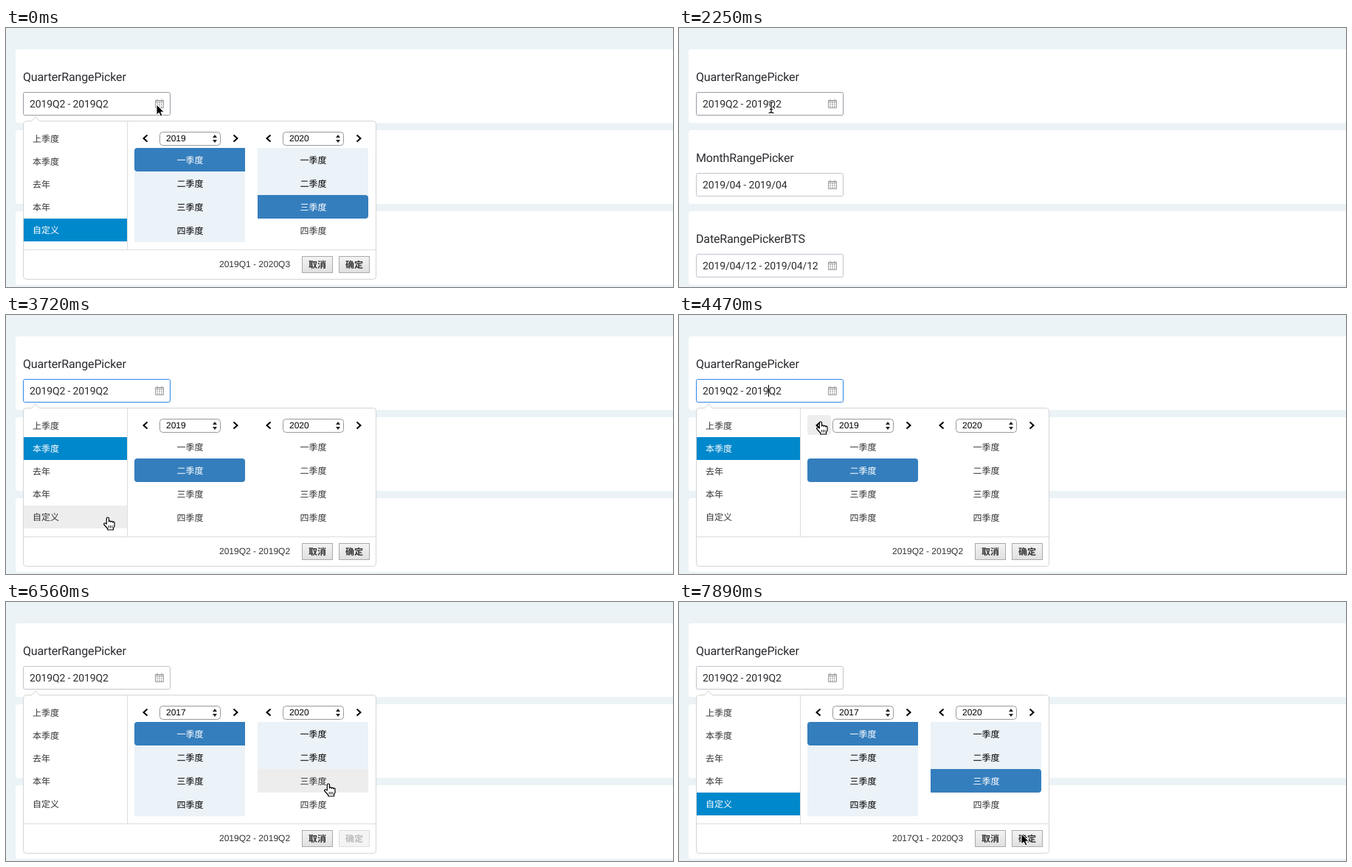
These frames come from a looping animation (904x352 px, 8 s). An HTML page:

```html
<!DOCTYPE html>
<html lang="zh">
<head>
<meta charset="utf-8">
<title>Quarter range picker</title>
<style>
  html, body { margin: 0; width: 100%; height: 100%; overflow: hidden; background: #ebf3f6; }
  svg { display: block; }
  text { font: 12px "Noto Sans CJK SC", "Noto Sans CJK", sans-serif; fill: #333; text-rendering: geometricPrecision; }
  .title { font: 16px Roboto, sans-serif; fill: #2b2b30; letter-spacing: -.01em; }
  .value { font: 14px Roboto, sans-serif; fill: #2b2b30; letter-spacing: -.01em; }
  .num { font: 12px "Liberation Sans", Arial, sans-serif; }
  .mid { text-anchor: middle; }
  .medium { font-weight: 500; }
  .bold { font-weight: 700; }
</style>
</head>
<body>
<svg id="stage" width="904" height="352" viewBox="0 0 904 352"></svg>
<script>
const LOOP = 8000, TICK = 148.8;
const stage = document.getElementById('stage');

const PRESETS = ['上季度', '本季度', '去年', '本年', '自定义'];
const QUARTERS = ['一季度', '二季度', '三季度', '四季度'];
const FIELDS = [
  ['QuarterRangePicker', '2019Q2 - 2019Q2'],
  ['MonthRangePicker', '2019/04 - 2019/04'],
  ['DateRangePickerBTS', '2019/04/12 - 2019/04/12']
];

// Pointer path: tick, x, y
const PATH = [
  [0, 204, 104], [2, 204, 104], [5, 112, 195], [7, 112, 195], [13, 122, 120],
  [15, 125, 107], [20, 122, 106], [22, 88, 212], [24, 97, 281], [26, 178, 268],
  [29, 193, 150], [30, 192, 145], [35, 192, 145], [38, 227, 180], [40, 227, 180],
  [44, 437, 247], [47, 430, 243], [48, 430, 243], [53, 464, 315]
];

// State changes by tick
const STATES = [
  [0, { open: true, preset: 4, year: 2019, from: 0, to: 6, label: '2019Q1 - 2020Q3' }],
  [7, { open: false }],
  [20, { open: true, focus: true, preset: 1, from: 1, to: 1, label: '2019Q2 - 2019Q2' }],
  [31, { focus: false, year: 2018, from: -1, to: -1 }],
  [33, { year: 2017 }],
  [39, { preset: -1, from: 0, to: -1, pending: true }],
  [46, { preset: 4, to: 6, pending: false, label: '2017Q1 - 2020Q3' }]
];

const rect = (x, y, w, h, fill, more = '') =>
  `<rect x="${x}" y="${y}" width="${w}" height="${h}" fill="${fill}" ${more}/>`;
const path = (d, fill, more = '') => `<path d="${d}" fill="${fill}" ${more}/>`;
const text = (x, y, s, cls = '', fill = '') =>
  `<text x="${x}" y="${y}" class="${cls}"${fill && ` style="fill:${fill}"`}>${s}</text>`;
const within = (p, x, y, w, h) => p.x >= x && p.x < x + w && p.y >= y && p.y < y + h;

function pointerAt(k) {
  const i = PATH.findIndex(p => p[0] > k);
  if (i < 0) return { x: PATH.at(-1)[1], y: PATH.at(-1)[2] };
  const [a, b] = [PATH[i - 1], PATH[i]];
  const f = (k - a[0]) / (b[0] - a[0]);
  return { x: Math.round(a[1] + (b[1] - a[1]) * f), y: Math.round(a[2] + (b[2] - a[2]) * f) };
}

const stateAt = k => Object.assign({}, ...STATES.filter(s => s[0] <= k).map(s => s[1]));

function hitTest(p, open) {
  const hit = { input: within(p, 23, 87, 200, 32), preset: -1, cell: -1, prev: false };
  if (!open) return hit;
  if (within(p, 24, 135, 140, 155)) hit.preset = Math.floor((p.y - 135) / 31);
  if (within(p, 174, 163, 317, 128))
    hit.cell = (p.x < 333 ? 0 : 4) + Math.floor((p.y - 163) / 32);
  hit.prev = within(p, 174, 136, 32, 27);
  return hit;
}

function calendarIcon(y) {
  let dots = '';
  for (let r = 0; r < 3; r++)
    for (let c = 0; c < 3; c++) dots += rect(204 + c * 3, y + 4 + r * 2.5, 2, 1.4, '#aaa');
  return path(`M202.5 ${y + 1.5}h11v10h-11zM205 ${y - 0.5}v2.5M211 ${y - 0.5}v2.5M202.5 ${y + 3}h11`,
    'none', 'stroke="#999"') + dots;
}

function field([title, value], i, border) {
  const y = 29 + i * 110;
  return rect(13, y, 900, 100, '#fff', 'rx="4"') +
    text(23, y + 43, title, 'title') +
    rect(23.5, y + 58.5, 199, 31, '#fff', `rx="2" stroke="${border}"`) +
    text(32, y + 79, value, 'value') + calendarIcon(y + 68);
}

const chevron = (x, dir) =>
  path(`M${x - 2.5 * dir} 145.5l${5 * dir} 4.5l${-5 * dir} 4.5`, 'none', 'stroke="#000" stroke-width="2"');

function header(x, year) {
  return chevron(x + 15, -1) + chevron(x + 137, 1) +
    rect(x + 34.5, 141.5, 82, 18, '#fff', 'rx="4" stroke="#999"') +
    text(x + 43, 154, year, 'num', '#000') +
    path(`M${x + 106} 149l3-4 3 4zM${x + 106} 152l3 4 3-4z`, '#222');
}

// A cell with independently rounded left and right ends
function cellShape(x, y, left, right, fill) {
  const l = left ? 4 : 0, r = right ? 4 : 0;
  return path(`M${x + l} ${y}H${x + 150 - r}q${r} 0 ${r} ${r}V${y + 32 - r}q0 ${r} ${-r} ${r}` +
    `H${x + l}q${-l} 0 ${-l} ${-l}V${y + l}q0 ${-l} ${l} ${-l}z`, fill);
}

function cell(i, s, hit) {
  const x = i < 4 ? 174 : 341, y = 163 + (i % 4) * 32;
  const end = s.pending ? hit.cell : s.to;
  const active = i === s.from || i === s.to, hover = i === hit.cell;
  const ranged = s.from >= 0 && i > s.from && i < end;
  let bg = '', ink = '#333';
  if (active) {
    bg = cellShape(x, y, i === s.from, i === s.to || s.pending && end <= s.from, '#357ebd');
    ink = '#fff';
  } else if (hover) {
    bg = cellShape(x, y, !s.pending, !s.pending, '#ededed');
  } else if (ranged) {
    bg = cellShape(x, y, false, false, '#ebf2f8');
    ink = '#000';
  }
  return bg + text(x + 75.5, y + 21, QUARTERS[i % 4], active ? 'mid medium' : 'mid', ink);
}

function button(x, label, off) {
  return rect(x + 0.5, 310.5, 41, 22, off ? '#f4f4f4' : 'url(#face)', `stroke="${off ? '#ddd' : '#aaa'}"`) +
    text(x + 21, 325.5, label, 'mid bold', off ? '#bbb' : '#333');
}

function panel(s, hit) {
  let out = rect(23.5, 126.5, 478, 215, '#fff', 'rx="4" stroke="#d4d4d4"') +
    path('M34 127l6-6 6 6', '#fff', 'stroke="#d4d4d4"') +
    path('M164.5 127v174M24 301.5h477', 'none', 'stroke="#ddd"');
  PRESETS.forEach((name, i) => {
    const y = 135 + i * 31, on = i === s.preset;
    if (on || i === hit.preset) out += rect(24, y, 140, 31, on ? '#08c' : '#ededed');
    out += text(36, y + 20, name, on ? 'medium' : '', on ? '#fff' : '');
  });
  if (hit.prev) out += rect(174, 136, 32, 27, '#ededed', 'rx="4"');
  out += header(174, s.year) + header(341, 2020);
  for (let i = 0; i < 8; i++) out += cell(i, s, hit);
  return out + text(289, 325, s.label, 'num') +
    button(401, '取消', false) + button(451, '确定', s.pending);
}

function pointer(p, hit) {
  let shape;
  if (hit.preset >= 0 || hit.cell >= 0 || hit.prev) {
    shape = path('M-1.7 9V1.6a1.6 1.6 0 0 1 3.2 0V6a1.3 1.3 0 0 1 2.6.4a1.3 1.3 0 0 1 2.6.5' +
      'a1.2 1.2 0 0 1 2.3.6V12L7.5 14.5V17H-.2V15.5L-5 10a1.3 1.3 0 0 1 2-1.8z', '#fff',
      'stroke="#000" stroke-width="1.2" stroke-linejoin="round"') +
      path('M1.2 11v3.5M3.5 11v3.5M5.8 11v3.5', 'none', 'stroke="#000" stroke-width=".9"');
  } else if (hit.input && p.x < 200) {
    const d = 'M-3.5-6.5q3 0 3.5 1.5q.5-1.5 3.5-1.5M0-5V7M-3.5 8.5q3 0 3.5-1.5q.5 1.5 3.5 1.5M-2 3.5h4';
    shape = path(d, 'none', 'stroke="#fff" stroke-width="2.6"') + path(d, 'none', 'stroke="#000" stroke-width="1.2"');
  } else {
    shape = path('M0 0V14.2L3.3 11.2L5.6 16L8 15L5.8 10.2H10.2z', '#000', 'stroke="#fff"');
  }
  return `<g transform="translate(${p.x} ${p.y})">${shape}</g>`;
}

function draw(k) {
  const s = stateAt(k), p = pointerAt(k), hit = hitTest(p, s.open);
  const border = s.focus ? '#2f86e8' : hit.input ? '#9a9aa6' : '#c3c4ce';
  const caret = s.focus && (k - 20) * 149 % 1000 < 500;
  stage.innerHTML =
    '<defs><linearGradient id="face" x2="0" y2="1"><stop stop-color="#f3f3f3"/>' +
    '<stop offset="1" stop-color="#e0e0e0"/></linearGradient></defs>' +
    rect(0, 0, 904, 352, '#ebf3f6') +
    FIELDS.map((f, i) => field(f, i, i ? '#c3c4ce' : border)).join('') +
    (caret ? rect(121, 95, 1, 16, '#000') : '') +
    (s.open ? panel(s, hit) : '') + pointer(p, hit);
}

let shown = -1;
const start = performance.now();
function frame() {
  const k = Math.floor((performance.now() - start) % LOOP / TICK);
  if (k !== shown) draw(shown = k);
  requestAnimationFrame(frame);
}
frame();
</script>
</body>
</html>
```
